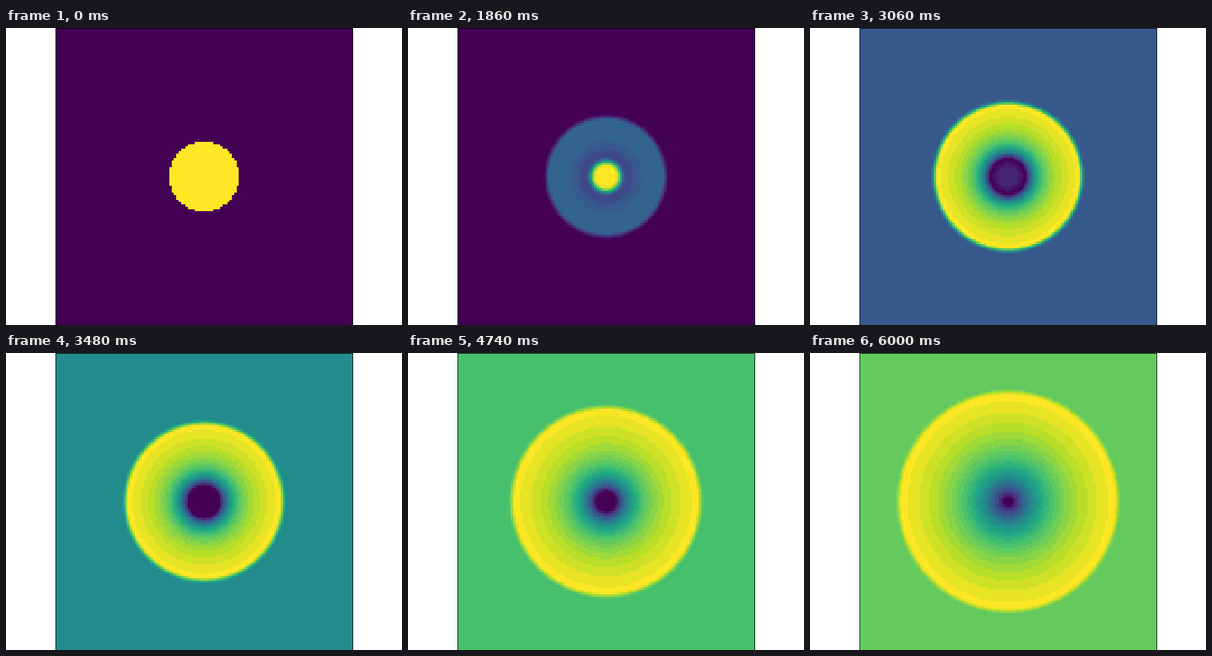
Animation, 640 px wide and 480 px high, one loop 6.06 s. Source, as an HTML page with a canvas:

```html
<!DOCTYPE html>
<html lang="en">
<head>
<meta charset="utf-8">
<title>Radial wave</title>
<style>
  html, body { margin: 0; width: 100%; height: 100%; overflow: hidden; background: #fff; }
  canvas { display: block; }
</style>
</head>
<body>
<canvas id="stage" width="640" height="480"></canvas>
<script>
const STEP = 60, COUNT = 101, N = 128, CELL = 3.75, LEVELS = 28;
const RADIUS = 15 * CELL;

const ctx = document.getElementById('stage').getContext('2d');
const grid = document.createElement('canvas');
grid.width = grid.height = N;
const gridCtx = grid.getContext('2d');
const image = gridCtx.createImageData(N, N);

const stops = '440154 482475 414487 355f8d 2a788e 21918c 22a884 44bf70 7ad151 bddf26 fde725'
  .split(' ')
  .map(hex => [0, 2, 4].map(i => parseInt(hex.slice(i, i + 2), 16)));

const mix = (a, b, t) => a + (b - a) * t;
const ramp = (a, b, x) => Math.min(1, Math.max(0, (x - a) / (b - a)));
const smooth = (a, b, x) => {
  const t = ramp(a, b, x);
  return t * t * (3 - 2 * t);
};

function color(v) {
  const x = v * (stops.length - 1);
  const i = Math.min(stops.length - 2, Math.floor(x));
  return stops[i].map((c, j) => mix(c, stops[i + 1][j], x - i));
}

// Water height over radius, where still water is 0 and the outer crest is 1.
function waveAt(k) {
  const settle = 1 - Math.exp(-k / 4);
  const foot = RADIUS + 1.18 * k + 7.5 * settle;
  const crest = foot - 9 * settle;

  // The trough left behind the outgoing front.
  const depth = settle * 4.15 / (1 + Math.exp((60 - k) / 13));
  const core = 53.3 - 0.473 * k;
  const decay = 0.17 + 0.08 * ramp(58, 100, k) ** 2;

  // The initial column, eaten away from its rim to the centre.
  const column = (1.25 + 0.037 * k) * (1 - smooth(31, 54, k));
  const top = Math.max(12, RADIUS - 1.33 * k);
  const base = Math.max(31, RADIUS - 0.75 * k);

  const height = r => {
    const x = ramp(core, crest, r);
    const trough = depth * mix(Math.exp(-x / decay), 1 - x, 0.22);
    const bump = column * (1 - smooth(top, base, r));
    return (1 - trough + bump) * (1 - ramp(crest, foot, r));
  };
  return { foot, height };
}

function draw(k) {
  const { foot, height } = waveAt(k);
  const radii = Array.from({ length: N * N }, (_, i) =>
    CELL * Math.hypot(i % N + 0.5 - N / 2, Math.floor(i / N) + 0.5 - N / 2));
  const heights = radii.map(height);
  const low = Math.min(...heights), span = Math.max(...heights) - low;
  const still = color(-low / span);

  heights.forEach((h, i) => {
    const level = Math.round((h - low) / span * LEVELS) / LEVELS;
    image.data.set([...(radii[i] < foot ? color(level) : still), 255], i * 4);
  });
  gridCtx.putImageData(image, 0, 0);

  ctx.fillStyle = '#fff';
  ctx.fillRect(0, 0, 640, 480);
  ctx.imageSmoothingEnabled = false;
  ctx.drawImage(grid, 80, 0, 480, 480);
  ctx.fillStyle = '#000';
  ctx.fillRect(80, 0, 481, 1);
  ctx.fillRect(80, 0, 1, 480);
  ctx.fillRect(560, 0, 1, 480);
}

const start = performance.now();
let shown = -1;

function tick() {
  const k = Math.floor((performance.now() - start) / STEP) % COUNT;
  if (k !== shown) draw(shown = k);
  requestAnimationFrame(tick);
}
tick();
</script>
</body>
</html>
```
